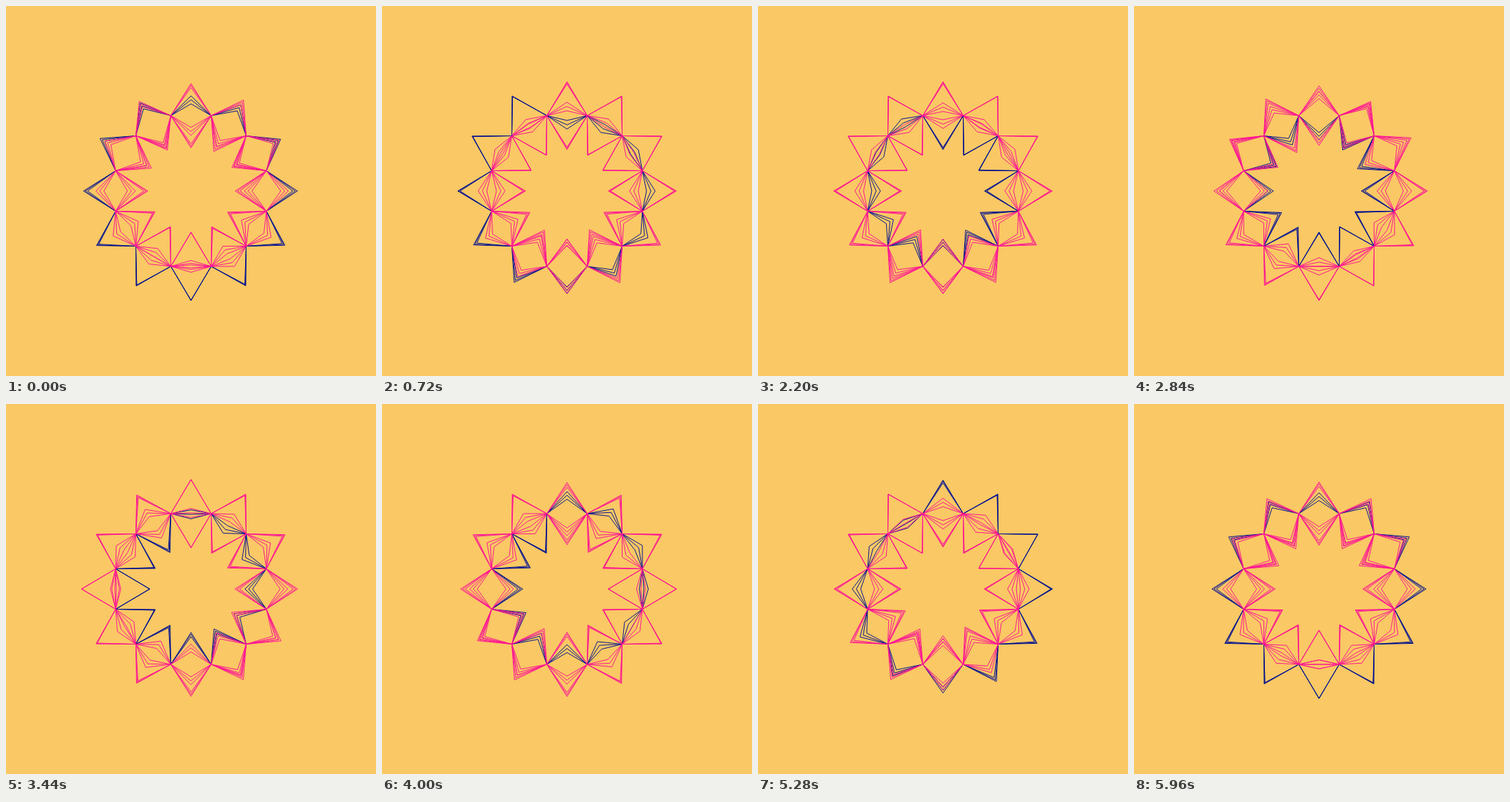
Write an HTML page that moves like this. It is 540 by 540 pixels and loops after 6 s.

```html
<!DOCTYPE html>
<html lang="en">
<head>
<meta charset="utf-8">
<title>Pulsing star ring</title>
<style>
  html, body { margin: 0; width: 100%; height: 100%; overflow: hidden; background: #fac864; }
  svg { display: block; width: 100%; height: 100%; }
  polygon { fill: none; stroke-width: 1; stroke-miterlimit: 10; }
</style>
</head>
<body>
<svg id="stage" viewBox="0 0 540 540"></svg>
<script>
const LOOP = 6000, STEP = 40;
const SIDES = 12, APOTHEM = 110, SWING = 50;
const CORNER = APOTHEM / Math.cos(Math.PI / SIDES);
const NAVY = '#001090', PINK = '#ff1493';
const rad = deg => deg * Math.PI / 180;
const stage = document.getElementById('stage');

// Four groups a quarter turn apart, each with three closely spaced stars.
const stars = [];
for (let group = 0; group < 4; group++) {
  for (let line = -1; line <= 1; line++) {
    const shape = document.createElementNS('http://www.w3.org/2000/svg', 'polygon');
    shape.setAttribute('stroke', group ? PINK : NAVY);
    stage.append(shape);
    stars.push({ shape, phase: group * 90 + line * 7.5 });
  }
}

// Angles run clockwise from the top.
function polar(radius, deg) {
  const x = 270 + radius * Math.sin(rad(deg));
  const y = 270 - radius * Math.cos(rad(deg));
  return x.toFixed(3) + ',' + y.toFixed(3);
}

function starPoints(phase) {
  const points = [];
  for (let k = 0; k < SIDES; k++) {
    const angle = k * 360 / SIDES;
    const tip = APOTHEM + SWING * Math.sin(rad(phase - 10 * k));
    points.push(polar(tip, angle), polar(CORNER, angle + 180 / SIDES));
  }
  return points.join(' ');
}

function render(ms) {
  const time = Math.floor((ms % LOOP) / STEP) * STEP;
  const turn = 152.4 + 360 * time / LOOP;
  for (const { shape, phase } of stars) {
    shape.setAttribute('points', starPoints(turn + phase));
  }
}

const start = performance.now();
function tick() {
  render(performance.now() - start);
  requestAnimationFrame(tick);
}
tick();
</script>
</body>
</html>
```
